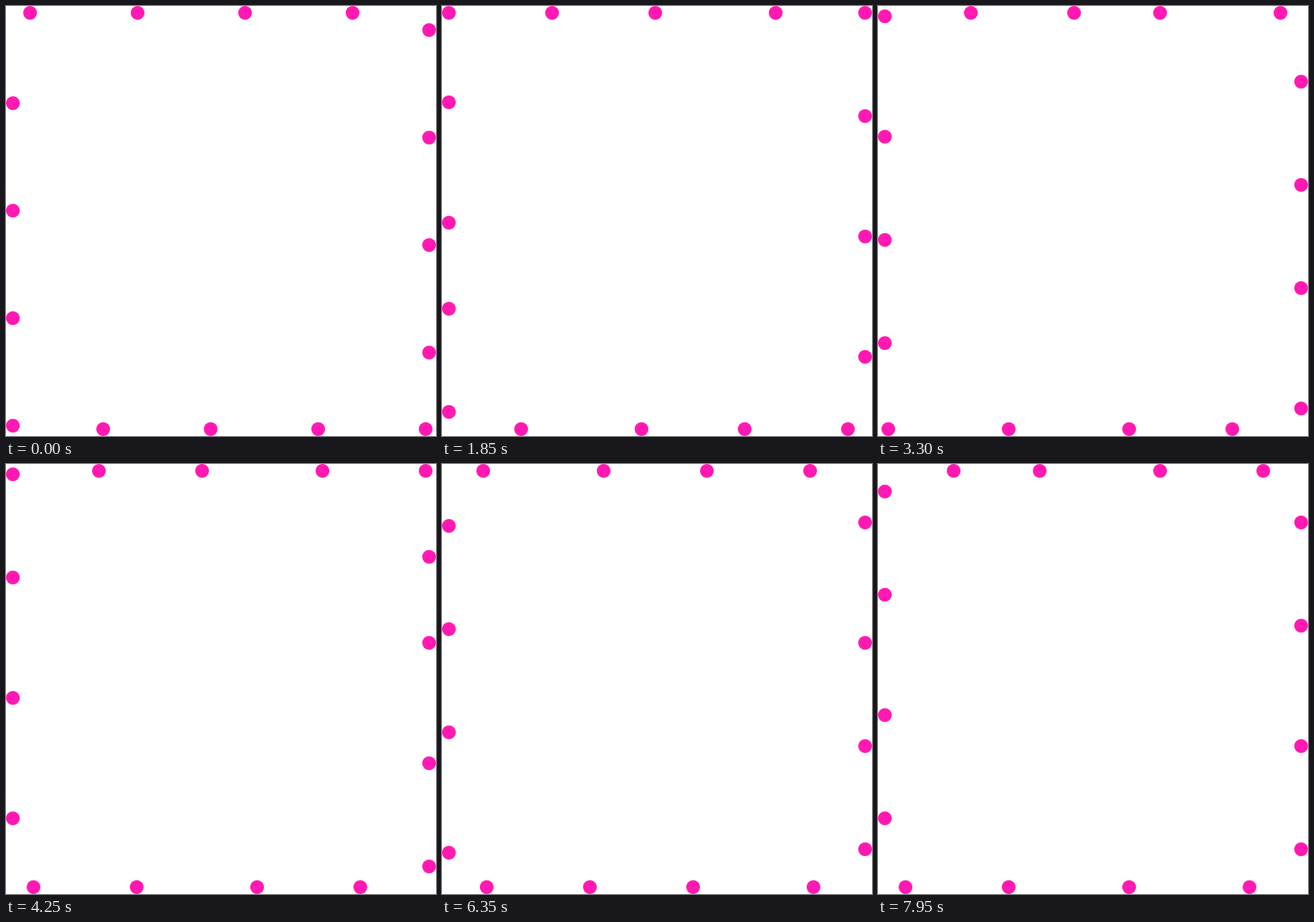
Recreate the animation shown at these times as an HTML page. Size 500 by 500 pixels, loop 8000 ms.

```html
<!DOCTYPE html>
<html lang="en">
<head>
<meta charset="utf-8">
<title>Marching dots</title>
<style>
  html, body { margin: 0; width: 100%; height: 100%; overflow: hidden; background: #fff; }
  svg { display: block; width: 100%; height: 100%; }
  circle { fill: #ff19b2; }
</style>
</head>
<body>
<svg viewBox="0 0 500 500"></svg>
<script>
const LOOP = 8000, TICK = 50, STRIDE = 20, RADIUS = 8;
const SPAN = 500 - 2 * RADIUS;
const TICKS_PER_SIDE = Math.ceil(SPAN / STRIDE);
const svg = document.querySelector('svg');

// Sides run clockwise from the top; offset is the distance from the side's first corner.
function pointOn(side, offset) {
  const near = RADIUS, far = RADIUS + SPAN;
  return [
    [near + offset, near],
    [far, near + offset],
    [far - offset, far],
    [near, far - offset],
  ][side % 4];
}

const dots = Array.from({ length: 16 }, (_, i) => {
  const side = Math.floor(i / 4);
  const start = (side < 2 ? 20 : 4) + 125 * (i % 4);
  const turn = Math.floor((SPAN - start) / STRIDE) + 1;
  const node = document.createElementNS(svg.namespaceURI, 'circle');
  node.setAttribute('r', RADIUS);
  svg.append(node);
  return { side, start, turn, node };
});

// A dot that would overshoot a corner stops there for its tick, then turns.
function locate({ side, start, turn }, tick) {
  if (tick < turn) return pointOn(side, start + STRIDE * tick);
  const since = tick - turn;
  const sidesPassed = 1 + Math.floor(since / TICKS_PER_SIDE);
  return pointOn(side + sidesPassed, STRIDE * (since % TICKS_PER_SIDE));
}

function draw(time) {
  const tick = Math.floor((time % LOOP) / TICK);
  for (const dot of dots) {
    const [x, y] = locate(dot, tick);
    dot.node.setAttribute('cx', x);
    dot.node.setAttribute('cy', y);
  }
}

function play(now) {
  draw(now);
  requestAnimationFrame(play);
}

draw(0);
requestAnimationFrame(play);
</script>
</body>
</html>
```
